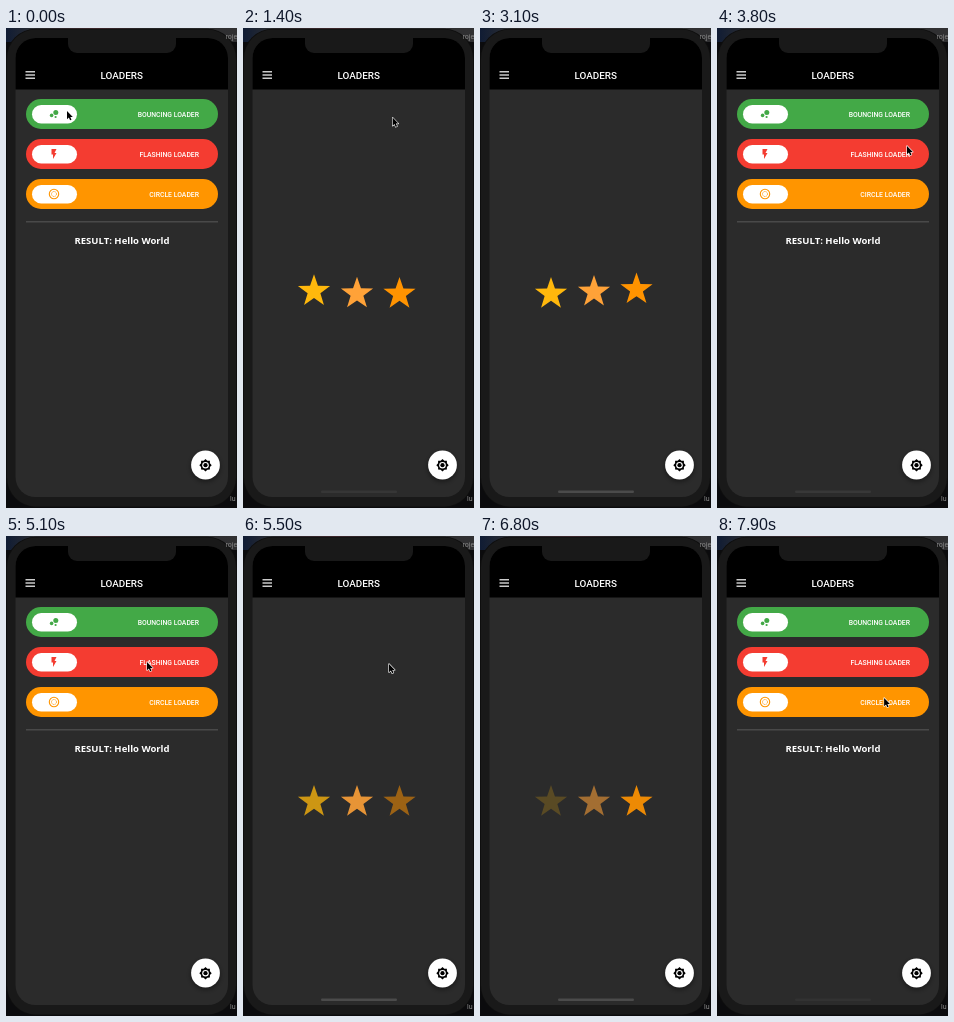
Write an HTML page with a canvas that moves like this. It is 231 px wide and 480 px high and loops after 8000 ms.

```html
<!DOCTYPE html>
<html lang="en">
<head>
<meta charset="utf-8">
<title>Loaders</title>
<style>
html, body { margin: 0; width: 100%; height: 100%; overflow: hidden; background: #141414; }
canvas { display: block; width: 231px; height: 480px; }
</style>
</head>
<body>
<canvas id="stage"></canvas>
<script>
const W = 231, H = 480, LOOP = 8000;
const canvas = document.getElementById('stage');
const ctx = canvas.getContext('2d');
const dpr = window.devicePixelRatio || 1;
canvas.width = W * dpr;
canvas.height = H * dpr;

const GREEN = '#43a947', RED = '#f43c31', ORANGE = '#ff9500';
const PANEL = '#2b2b2b', BODY = '#191919';
const BOUNCE = { start: 1290, end: 3250, origin: 1290, step: 98 };
const FLASH = { start: 5180, end: 7150, origin: 5006, step: 140 };
const FADE = 400;
const STARS = [[71, '#ffb80c'], [114, '#ffa238'], [156.5, '#ff9300']];

// time, x, y of the pointer tip
const POINTER = [
  [0, 61, 83], [450, 92, 87], [1000, 148, 88], [1500, 150, 90], [2000, 154, 100],
  [2700, 163, 97], [3000, 240, 90], [3450, 240, 100], [3800, 190, 118],
  [4500, 150, 126], [5100, 141, 126], [5500, 146, 128], [5900, 240, 140],
  [6850, 240, 155], [7200, 195, 162], [7600, 169, 162], [8000, 166.5, 162]
];

const clamp = v => Math.max(0, Math.min(1, v));
const within = (t, phase) => t >= phase.start && t < phase.end;

function box(x, y, w, h, r, fill) {
  ctx.fillStyle = fill;
  ctx.beginPath();
  ctx.roundRect(x, y, w, h, r);
  ctx.fill();
}

function disc(x, y, r, fill) {
  ctx.fillStyle = fill;
  ctx.beginPath();
  ctx.arc(x, y, r, 0, Math.PI * 2);
  ctx.fill();
}

function ring(x, y, r, width, color, dash = []) {
  ctx.strokeStyle = color;
  ctx.lineWidth = width;
  ctx.setLineDash(dash);
  ctx.beginPath();
  ctx.arc(x, y, r, 0, Math.PI * 2);
  ctx.stroke();
  ctx.setLineDash([]);
}

function label(text, x, y, font, align, color = '#fff') {
  ctx.font = font;
  ctx.textAlign = align;
  ctx.fillStyle = color;
  ctx.fillText(text, x, y);
}

function spikes(x, y, n, outer, inner, fill) {
  ctx.beginPath();
  for (let i = 0; i < n * 2; i++) {
    const r = i % 2 ? inner : outer;
    const a = i * Math.PI / n - Math.PI / 2;
    ctx.lineTo(x + r * Math.cos(a), y + r * Math.sin(a));
  }
  ctx.closePath();
  ctx.fillStyle = fill;
  ctx.fill();
}

// Rise and fall of star i, each one starting a step after the last.
function wave(t, phase, i) {
  const cycle = 2 * FADE + 2 * phase.step;
  const u = ((t - phase.origin) % cycle - i * phase.step) / FADE;
  return clamp(1 - Math.abs(u - 1));
}

function drawFrame() {
  ctx.fillStyle = '#0b0b0d';
  ctx.fillRect(0, 0, W, H);
  const edge = ctx.createLinearGradient(0, 0, W, 0);
  edge.addColorStop(0, '#101c34');
  edge.addColorStop(0.12, '#2b2d32');
  edge.addColorStop(0.4, '#4a2c33');
  edge.addColorStop(0.6, '#2a2a2c');
  edge.addColorStop(1, '#303032');
  ctx.fillStyle = edge;
  ctx.fillRect(0, 0, W, 14);
  box(0, 0.8, W, 478.4, 30, '#0e0e0e');
  box(1, 1.5, W - 2, 477, 29, BODY);
  label('roje', 219.5, 10.5, '7px Roboto, sans-serif', 'left', '#858585');
  label('lu', 224, 473, '7px Roboto, sans-serif', 'left', '#8d8d8d');

  ctx.save();
  ctx.beginPath();
  ctx.roundRect(9.5, 10, 212.5, 459, 20);
  ctx.clip();
  ctx.fillStyle = PANEL;
  ctx.fillRect(0, 0, W, H);
  ctx.fillStyle = '#000';
  ctx.fillRect(0, 0, W, 61.5);
  ctx.restore();
  box(62, 5, 108, 20, [0, 0, 9, 9], BODY);

  for (let i = 0; i < 3; i++) box(19.5, 43.2 + i * 3.2, 9.5, 1.2, 0, '#fff');
  label('LOADERS', 115.7, 50.8, '500 9.9px Roboto, sans-serif', 'center');
}

function bubbles() {
  disc(45.6, 87.4, 1.8, GREEN);
  disc(49.6, 89, 1.1, GREEN);
  disc(49.8, 84.5, 2.5, GREEN);
}

function bolt() {
  ctx.save();
  ctx.translate(42, 120);
  ctx.scale(0.5, 0.5);
  ctx.fillStyle = RED;
  ctx.fill(new Path2D('M7 2v11h3v9l7-12h-4l4-8z'));
  ctx.restore();
}

function rings() {
  ring(48, 166, 4.7, 1.1, ORANGE);
  ring(48, 166, 2.5, 0.9, ORANGE, [1.2, 0.8]);
}

function drawMenu() {
  const rows = [
    ['BOUNCING LOADER', GREEN, bubbles],
    ['FLASHING LOADER', RED, bolt],
    ['CIRCLE LOADER', ORANGE, rings]
  ];
  rows.forEach(([text, color, icon], i) => {
    const y = 71 + i * 40;
    box(20, y, 192, 30, 15, color);
    box(26, y + 6, 45, 18.5, 9.2, '#fff');
    icon();
    label(text, 193, y + 17.6, '500 6.85px Roboto, sans-serif', 'right');
  });
  box(20, 193.4, 192, 0.9, 0, '#686868');
  label('RESULT: Hello World', 116, 215.6, '700 9.5px "Open Sans", sans-serif', 'center');
}

function drawStars(t) {
  const bouncing = within(t, BOUNCE);
  STARS.forEach(([x, color], i) => {
    const v = wave(t, bouncing ? BOUNCE : FLASH, i);
    ctx.globalAlpha = bouncing ? 1 : v;
    spikes(x, 266 - (bouncing ? 10 * v : 0), 5, 16.9, 6.7, color);
  });
  ctx.globalAlpha = 1;
}

function drawHomeBar(t) {
  const shown = p => clamp((t - p.start) / 300) * clamp(1 - (t - p.end) / 950);
  ctx.globalAlpha = Math.max(shown(BOUNCE), shown(FLASH));
  box(78, 462.5, 76, 2.5, 1.2, '#4b4b4b');
  ctx.globalAlpha = 1;
}

function drawFab() {
  ctx.save();
  ctx.shadowColor = 'rgba(0,0,0,.45)';
  ctx.shadowBlur = 5 * dpr;
  ctx.shadowOffsetY = 2 * dpr;
  disc(199.5, 437, 14.4, '#fff');
  ctx.restore();
  spikes(199.5, 437.2, 8, 6.2, 4.8, '#000');
  disc(199.5, 437.2, 3.3, '#fff');
  disc(199.5, 437.2, 2.1, '#000');
}

function drawPointer(t) {
  const n = POINTER.findIndex(p => p[0] > t);
  const [t0, x0, y0] = POINTER[n - 1], [t1, x1, y1] = POINTER[n];
  const u = (t - t0) / (t1 - t0);
  ctx.save();
  ctx.translate(x0 + (x1 - x0) * u, y0 + (y1 - y0) * u);
  const arrow = new Path2D('M0 0V8.2L1.9 6.5L3.1 9.3L4.5 8.7L3.3 6H5.8Z');
  ctx.strokeStyle = '#fff';
  ctx.lineWidth = 1.2;
  ctx.lineJoin = 'round';
  ctx.stroke(arrow);
  ctx.fillStyle = '#000';
  ctx.fill(arrow);
  ctx.restore();
}

function draw(now) {
  const t = now % LOOP;
  ctx.setTransform(dpr, 0, 0, dpr, 0, 0);
  drawFrame();
  if (within(t, BOUNCE) || within(t, FLASH)) drawStars(t);
  else drawMenu();
  drawHomeBar(t);
  drawFab();
  drawPointer(t);
}

let begin;
function tick(now) {
  begin ??= now;
  draw(Math.max(0, now - begin));
  requestAnimationFrame(tick);
}
draw(0);
requestAnimationFrame(tick);
</script>
</body>
</html>
```
